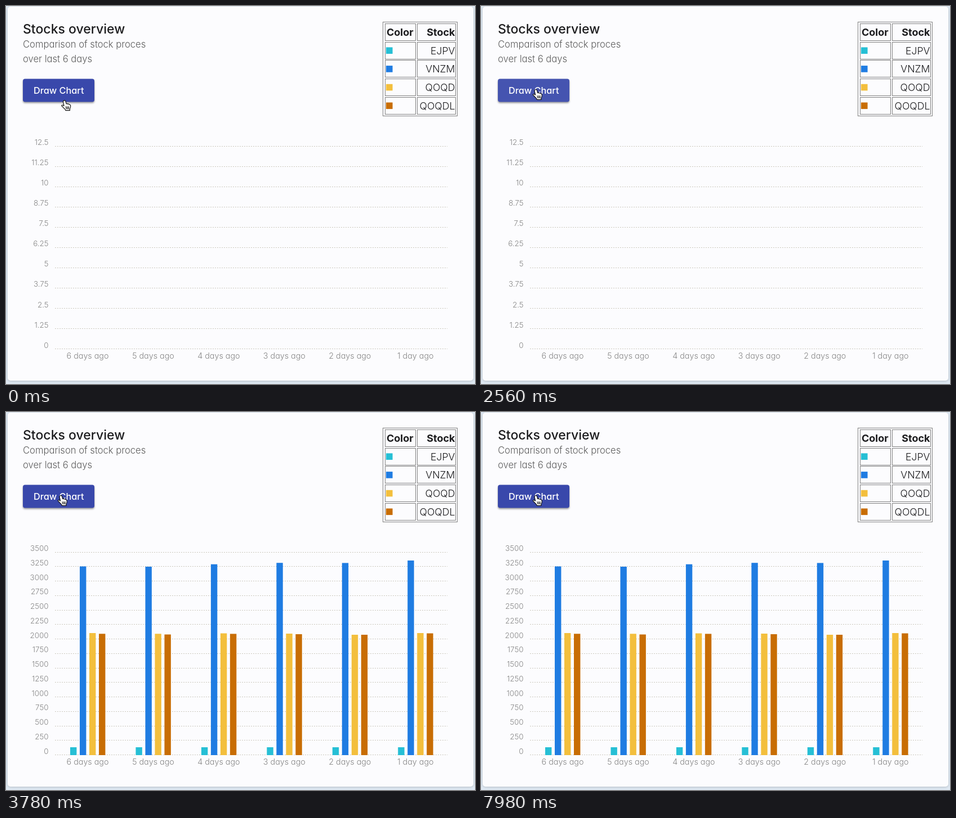
An HTML page for the animation above (8 s loop, 833 by 672 pixels).

```html
<!DOCTYPE html>
<html lang="en">
<head>
<meta charset="utf-8">
<title>Stocks overview</title>
<style>
  html, body { margin: 0; width: 100%; height: 100%; overflow: hidden; background: #e0eaf4; }
  svg { display: block; font-family: Inter, "Open Sans", sans-serif; font-feature-settings: "cv11"; }
  .card { fill: #fcfcfe; filter: drop-shadow(0 1px 2px #0003); }
  .button { fill: #3948ab; filter: drop-shadow(0 2px 1.5px #0006); }
  .title { font-size: 23px; font-weight: 500; fill: #1c1c1e; }
  .subtitle { font-size: 16.6px; font-weight: 300; fill: #5c5c5c; }
  .caption { font-size: 16.3px; font-weight: 500; fill: #fff; }
  .head { font-size: 18px; font-weight: 700; fill: #1c1c1e; }
  .cell { font-size: 17.7px; font-weight: 300; fill: #1c1c1e; }
  .value { font-size: 13.4px; font-weight: 300; fill: #858585; }
  .day { font-size: 14.3px; font-weight: 300; fill: #858585; }
  .end { text-anchor: end; }
  .mid { text-anchor: middle; }
  .border { fill: none; stroke: #808080; }
  .grid { stroke: #cbc8bd; stroke-dasharray: 2 2; }
</style>
</head>
<body>
<svg id="stage" width="833" height="672" viewBox="0 0 833 672">
  <defs><clipPath id="buttonClip"><rect x="30" y="129.5" width="127" height="41" rx="4"/></clipPath></defs>
  <rect class="card" x="3" y="1" width="827" height="665" rx="5"/>
  <text class="title" x="30" y="48.5">Stocks overview</text>
  <text class="subtitle" x="30" y="73.5">Comparison of stock proces</text>
  <text class="subtitle" x="30" y="99.5">over last 6 days</text>
  <rect class="button" x="30" y="129.5" width="127" height="41" rx="4"/>
  <g clip-path="url(#buttonClip)"><circle id="ripple" cx="97" cy="150" fill="#fff"/></g>
  <text class="caption mid" x="93.7" y="155.5">Draw Chart</text>
  <g id="legend"></g>
  <g id="empty"></g>
  <g id="filled"></g>
  <g id="days"></g>
  <g id="cursor" stroke="#111" stroke-width="1.2" stroke-linejoin="round" stroke-linecap="round">
    <path fill="#fff" d="M5 1.2Q7 .2 8 2.7L9.2 7Q11 6 12 7.5Q14 6.7 14.6 8.4Q16.4 8 16.7 10.5Q17 13.5 15.4 16V18.8H8Q7 16 4.2 14L.9 10.6Q.7 8.6 3 9.3L5 10.5L3.5 3.5Q3.3 2 5 1.2Z"/>
    <path fill="none" d="M8.5 12l.8 4M11 12l.4 4M13.4 12v4"/>
  </g>
</svg>
<script>
const LOOP = 8000, CHART_AT = 3640, PRESS_AT = 2260, RELEASE_AT = 2480;
const TOP = 249, BASE = 609.7, LEFT = 87, RIGHT = 784, GROUP = 116.45;
const series = [
  { name: "EJPV", color: "#26bfd5", tops: [596, 596, 596, 596, 596, 596] },
  { name: "VNZM", color: "#1f7ce2", tops: [274.5, 275, 270.7, 268.2, 268.4, 264] },
  { name: "QOQD", color: "#f3bf3d", tops: [393, 394.3, 393.5, 394, 396, 393] },
  { name: "QOQDL", color: "#c86d04", tops: [394.3, 395.5, 394.4, 395, 396, 393.5] }
];

const byId = id => document.getElementById(id);
function add(parent, tag, attrs, text = "") {
  const node = document.createElementNS("http://www.w3.org/2000/svg", tag);
  for (const key in attrs) node.setAttribute(key, attrs[key]);
  node.textContent = text;
  return parent.appendChild(node);
}

function drawLegend(parent) {
  const box = (x, y, width, height) => add(parent, "rect", { class: "border", x, y, width, height });
  box(669.5, 28.5, 132, 167);
  for (let row = 0; row < 5; row++) {
    const y = Math.round(31 + row * 32.7) + 0.5;
    box(673.5, y, 54, 30);
    box(730.5, y, 68, 30);
  }
  add(parent, "text", { class: "head", x: 676, y: 53 }, "Color");
  add(parent, "text", { class: "head end", x: 797.5, y: 53 }, "Stock");
  series.forEach(({ name, color }, i) => {
    const y = 79.2 + i * 32.7;
    add(parent, "rect", { x: 675, y: y - 5.8, width: 11.6, height: 11.6, fill: color });
    add(parent, "text", { class: "cell end", x: 797.5, y: y + 6.4 }, name);
  });
}

function drawAxis(parent, max, steps) {
  for (let i = 0; i <= steps; i++) {
    const y = TOP + (BASE - TOP) * i / steps;
    const lineY = Math.round(y - 0.5) + 0.5;
    add(parent, "line", { class: "grid", x1: LEFT, x2: RIGHT, y1: lineY, y2: lineY });
    add(parent, "text", { class: "value end", x: 75.5, y: y - 2 }, max * (steps - i) / steps);
  }
}

function drawBars(parent) {
  series.forEach(({ color, tops }, s) => tops.forEach((y, day) =>
    add(parent, "rect", { x: 114 + s * 17 + day * GROUP, y, width: 11.4, height: 610 - y, fill: color })));
}

drawLegend(byId("legend"));
drawAxis(byId("empty"), 12.5, 10);
drawAxis(byId("filled"), 3500, 14);
drawBars(byId("filled"));
for (let i = 0; i < 6; i++) {
  const ago = 6 - i;
  add(byId("days"), "text", { class: "day mid", x: 145 + i * GROUP, y: 627 }, `${ago} day${ago > 1 ? "s" : ""} ago`);
}

const progress = (t, from, length) => Math.min(1, Math.max(0, (t - from) / length));
const easeOut = p => 1 - (1 - p) ** 2;

function render(t) {
  const move = easeOut(progress(t, 0, 400));
  byId("cursor").setAttribute("transform", `translate(${98 - 6.5 * move} ${167 - 19.5 * move})`);

  byId("ripple").setAttribute("r", 75 * easeOut(progress(t, PRESS_AT, 240)));
  byId("ripple").setAttribute("opacity", 0.08 * (1 - progress(t, RELEASE_AT, 400)));

  const loaded = t >= CHART_AT;
  byId("empty").style.display = loaded ? "none" : "";
  byId("filled").style.display = loaded ? "" : "none";
}

function tick() {
  render(performance.now() % LOOP);
  requestAnimationFrame(tick);
}
tick();
</script>
</body>
</html>
```
